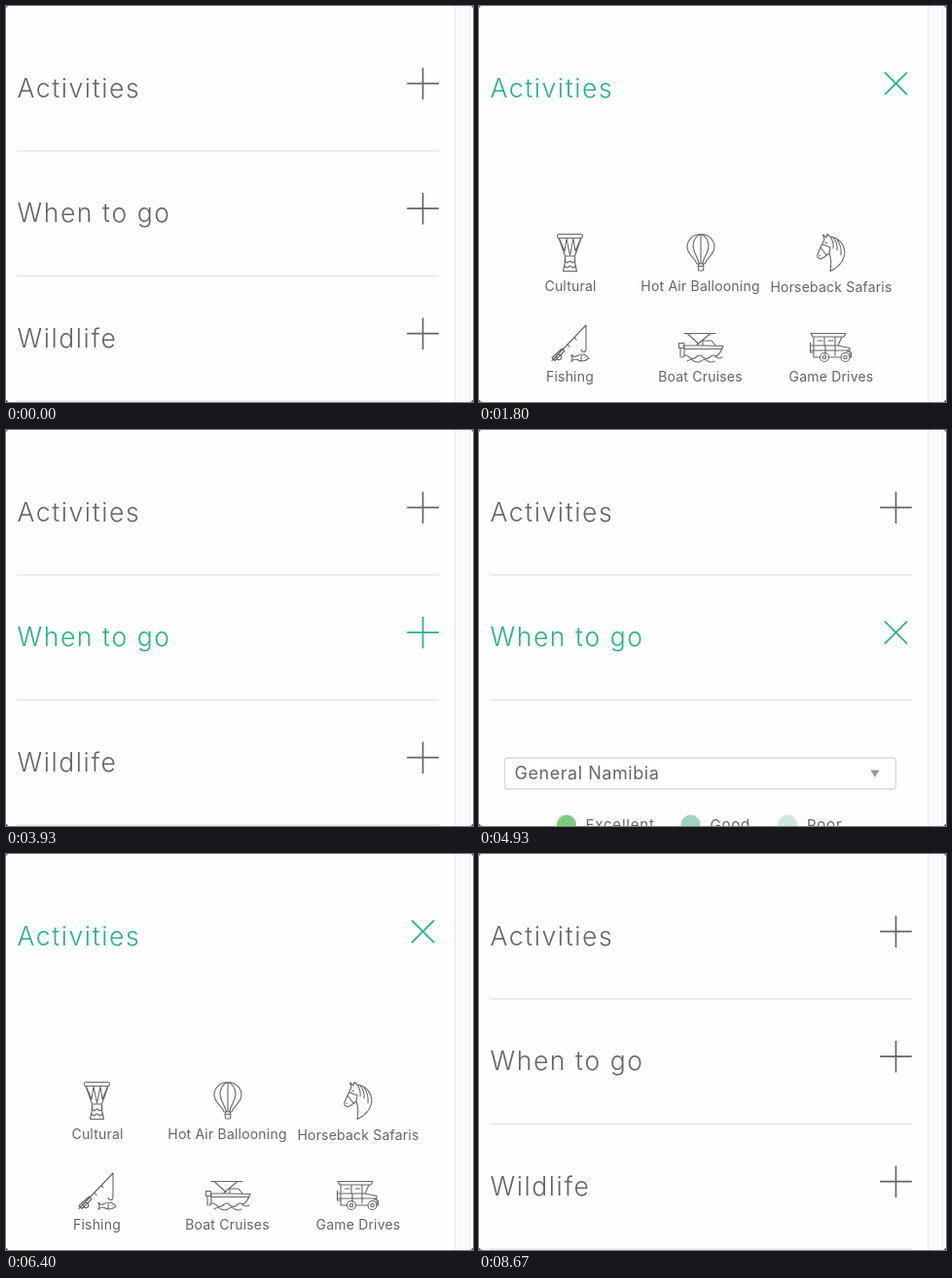
An HTML page for the animation above (9340 ms loop, 480 px wide and 407 px high).

```html
<!DOCTYPE html>
<html lang="en">
<head>
<meta charset="utf-8">
<title>Accordion</title>
<style>
  html, body { margin: 0; width: 100%; height: 100%; overflow: hidden; background: #fffeff; }
  svg { display: block; width: 480px; height: 407px; font-family: Inter, "Open Sans", sans-serif; fill: #666; }
  .title { font-size: 26.5px; font-weight: 300; letter-spacing: 1.6px; fill: currentColor; }
  .cross { stroke: currentColor; stroke-width: 1.7; }
  .rule { stroke: #eae9ed; stroke-width: 1.7; }
  .label { font-size: 14px; letter-spacing: .2px; text-anchor: middle; }
  .icon { fill: none; stroke: #686868; stroke-width: 1.1; stroke-linejoin: round; stroke-linecap: round; }
  .choice { font-size: 18px; letter-spacing: .55px; }
  .legend { font-size: 15px; letter-spacing: .8px; }
</style>
</head>
<body>
<svg id="stage" viewBox="0 0 480 407">
  <defs>
    <clipPath id="clip0"><rect y="146" width="460" height="0"/></clipPath>
    <clipPath id="clip1"><rect y="279" width="460" height="0"/></clipPath>
  </defs>
  <rect width="480" height="407" fill="#fffeff"/>

  <g clip-path="url(#clip0)">
    <g class="icon">
      <!-- drum -->
      <rect x="80.5" y="234.5" width="26" height="4" rx="1.8"/>
      <path d="M82 238.500 88.500 257H98.500L105 238.500M82.500 239 88 252 90 239 93.500 256 97 239 99 252 104.500 239M88.500 257Q89 264 86.500 272.500H100.500Q98 264 98.500 257M88 262l2.500 2 3-2 3 2 2.500-2M87.500 267l3 2 3-2 3 2 3-2"/>
      <!-- balloon -->
      <path d="M224 265C222 258 214 256 214 247.500a14 13 0 0 1 28 0C242 256 234 258 232 265ZM226.500 265C224 256 220 253 220 246Q221 237 228 234.500Q235 237 236 246C236 253 232 256 229.500 265M228 234.500V265M225.500 265v2.500h5V265M225 267.500h6l-.7 4.500h-4.600Z"/>
      <!-- horse -->
      <path d="M355 240 352 246 348 255Q347 259 351 260L355 258 360 254Q363 262 361 272.500Q375 266 376 253Q374 239 361 237L358 234.500 357 238 353.500 235 355 240M361 237Q365 243 364 249M364 238Q369 244 368 251M368 240Q373 247 372 256M351 248 357 256M353 245 361 248 360 254M356 243.500h1.500M350 256.500h.5"/>
      <!-- rod and fish -->
      <path d="M75 364.500 110 328M75 361.500 78 364.500 88 354.500 85.500 352ZM110 328V352q0 4-3 3.500q-2-.5-2-2.500M91 348l2 2.500M98 340.500l2 2.500"/>
      <circle cx="82" cy="361" r="2.700"/>
      <path d="M95 358.500Q98 361.500 101 359.500Q108 355.500 113 362Q107 367 101 363.500Q98 362 95 365.500Q97 362 95 358.500M109 361h.4M105.500 359.500q-1.500 2.500 0 5"/>
      <!-- boat -->
      <path d="M211 336.500H243M214 336.500 226 347.500M238 336.500 224 348M230 348V344L239 344 243 349M211 349H230L251 349.500Q248 358 243 360.500M211 349V359M205.500 346.500h5v5h-5ZM207 351.500V361M211 352.500H249M209 361q4-4 7 0q4 3 7 0q4-4 7 0q4 3 7 0q4-4 7 0q3 2 6 0M214 365q4-3 7 0q4 2 7 0q4-3 7 0q4 2 7 0"/>
      <!-- jeep -->
      <path d="M341 336.500H377L375 340H343ZM344 340V349M355 340V349M366 340V349M373 340 369 349M340.500 346v10h3M340.500 349H369L381 351.500V361M344 349V361H350.500M359.500 361H372M340.500 354H381M356 349V358M366 349V359M378 355h3M348 344h5M359 344h5M382.500 356v5H381"/>
      <circle cx="355" cy="361" r="4.500"/><circle cx="355" cy="361" r="1.700"/>
      <circle cx="376.500" cy="361" r="4.500"/><circle cx="376.500" cy="361" r="1.700"/>
    </g>
    <g class="label">
      <text x="94" y="293">Cultural</text>
      <text x="227.500" y="293">Hot Air Ballooning</text>
      <text x="362" y="294">Horseback Safaris</text>
      <text x="93.500" y="386">Fishing</text>
      <text x="227.500" y="386">Boat Cruises</text>
      <text x="362" y="386">Game Drives</text>
    </g>
  </g>

  <g clip-path="url(#clip1)">
    <rect x="26.500" y="337" width="402" height="32" rx="3" fill="#fff" stroke="#d9d8dd" stroke-width="1.300"/>
    <text class="choice" x="36.500" y="358.500">General Namibia</text>
    <path d="M402.500 349.500h9l-4.500 7.500Z" fill="#999"/>
    <circle cx="90" cy="405.500" r="10" fill="#7fcb7e"/>
    <circle cx="217.500" cy="405.500" r="10" fill="#9ed5c1"/>
    <circle cx="317" cy="405.500" r="10" fill="#d0e8dd"/>
    <g class="legend">
      <text x="109.500" y="410.500">Excellent</text>
      <text x="237.500" y="410.500">Good</text>
      <text x="337" y="410.500">Poor</text>
    </g>
  </g>

  <g id="rows"></g>

  <rect x="461" width="16" height="407" fill="#f9f8fb"/>
  <path d="M461.500 0V407M476.500 0V407" stroke="#e9e8ec"/>
  <path d="M0 0h2L0 2ZM480 0h-2l2 2ZM0 407h2.500L0 404.500ZM480 407h-2.500l2.500-2.500Z" fill="#555"/>
</svg>
<script>
const LOOP = 9340, TICK = 200 / 3;
const PITCH = 128.5, PANEL = 700;
const GRAY = [102, 102, 102], GREEN = [38, 180, 130];

// Times below are in ticks of 1/15 s.
const openings = [
  { row: 0, open: 24, close: 39 },
  { row: 1, open: 59, close: 74 },
  { row: 0, open: 89, close: 102 },
];
const hovers = [
  { row: 0, enter: [17, 21], leave: [52, 56] },
  { row: 1, enter: [52, 56], leave: [81, 83] },
  { row: 0, enter: [81, 83], leave: [105, 108] },
  { row: 1, enter: [105, 108], leave: [108, 112] },
  { row: 2, enter: [108, 112], leave: [114, 117] },
];

const ramp = (n, a, b) => Math.min(1, Math.max(0, (n - a) / (b - a)));
const ease = p => (1 - Math.cos(Math.PI * p)) / 2;
const sumFor = (list, row, value) =>
  list.reduce((sum, item) => item.row === row ? sum + value(item) : sum, 0);

const rowsEl = document.getElementById("rows");
const rows = ["Activities", "When to go", "Wildlife"].map((name, i) => {
  rowsEl.insertAdjacentHTML("beforeend",
    `<g><text class="title" x="11.5" y="93.7">${name}</text>
     <path class="cross" d="M-16.3 0H16.3M0 -16.3V16.3"/>
     <path class="rule" d="M11 148.8H445"/></g>`);
  const el = rowsEl.lastElementChild;
  return {
    el,
    cross: el.querySelector(".cross"),
    rule: el.querySelector(".rule"),
    clip: document.querySelector(`#clip${i} rect`),
  };
});

function draw(n) {
  let y = 0;
  rows.forEach((row, i) => {
    const hover = sumFor(hovers, i, h => ramp(n, ...h.enter) - ramp(n, ...h.leave));
    const height = PANEL * sumFor(openings, i, o =>
      ease(ramp(n, o.open, o.open + 6)) - ease(ramp(n, o.close, o.close + 5)));
    const turn = 45 * sumFor(openings, i, o =>
      ease(ramp(n, o.open, o.open + 3)) - ease(ramp(n, o.close, o.close + 4)));
    const isOpen = openings.some(o => o.row === i && n > o.open && n < o.close);

    const color = GRAY.map((c, k) => Math.round(c + (GREEN[k] - c) * hover));
    row.el.setAttribute("color", `rgb(${color})`);
    row.el.setAttribute("transform", `translate(0 ${y})`);
    row.cross.setAttribute("transform", `translate(428.5 79.7) rotate(${turn})`);
    row.rule.setAttribute("visibility", isOpen ? "hidden" : "visible");
    if (row.clip) row.clip.setAttribute("height", height);
    y += PITCH + height;
  });
}

function frame() {
  const t = performance.now() % LOOP;
  draw(Math.min(139, Math.floor(t / TICK + 0.2)));
  requestAnimationFrame(frame);
}
frame();
</script>
</body>
</html>
```
